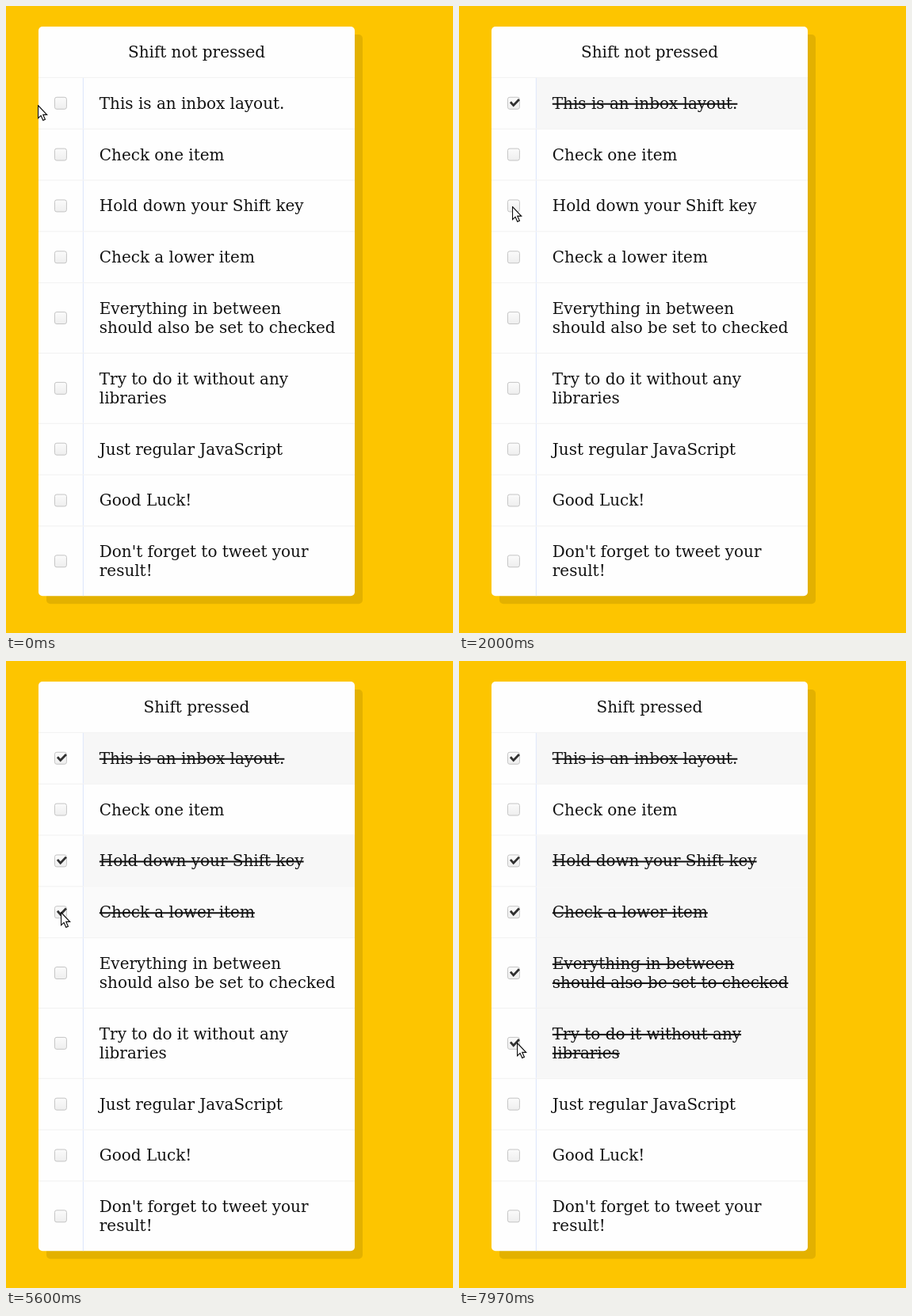
Write an HTML page that moves like this. It is 564 by 792 pixels and loops after 8 s.

```html
<!DOCTYPE html>
<html lang="en">
<head>
<meta charset="utf-8">
<title>Shift-select checklist</title>
<style>
  html, body { margin: 0; width: 100%; height: 100%; overflow: hidden; background: #fdc500; }
  .card {
    position: absolute; left: 41px; top: 26px; width: 400px;
    transform: scale(.9975); transform-origin: 0 0;
    font: 20px/24px "DejaVu Serif", serif; color: #111;
    background: #fefefe; border-radius: 5px; box-shadow: 10px 10px 0 rgba(0, 0, 0, .1);
  }
  .header { padding: 20px; text-align: center; }
  .header, .row { border-bottom: 1px solid #f1f1f1; }
  .row { position: relative; }
  .row:last-child { border: 0; }
  .label { position: relative; margin-left: 56px; padding: 20px; border-left: 1px solid #dbe5fb; }
  .shade { position: absolute; inset: 0; background: #f7f7f7; opacity: 0; }
  .text { position: relative; white-space: nowrap; }
  .done .text { text-decoration: line-through; }
  .check { position: absolute; left: 20px; top: calc(50% - 8px); overflow: visible; }
  .box { fill: url(#boxFill); stroke: #c4c4c4; }
  .hover .box { fill: #fdfdfd; stroke: #dcdcdc; }
  .tick { fill: none; stroke: #303030; stroke-width: 2.8; visibility: hidden; }
  .done .tick { visibility: visible; }
  .cursor { position: absolute; left: 0; top: 0; }
</style>
</head>
<body>
<div class="card">
  <div class="header"></div>
</div>
<svg class="cursor" width="14" height="22">
  <linearGradient id="boxFill" x2="0" y2="1">
    <stop stop-color="#fbfbfb"/><stop offset="1" stop-color="#eee"/>
  </linearGradient>
  <path d="M.5 .5V16.8L4.1 13.4 6.8 19.4 9.4 18.3 6.8 12.4H11.6Z"
        fill="#fff" stroke="#111" stroke-width="1.2"/>
</svg>
<script>
const LOOP = 8000, SHIFT_AT = 4100, FADE = 200;

// label, check time (if any)
const items = [
  ["This is an inbox layout.", 1480],
  ["Check one item"],
  ["Hold down your Shift key", 2770],
  ["Check a lower item", 5500],
  ["Everything in between<br>should also be set to checked", 6900],
  ["Try to do it without any<br>libraries", 6900],
  ["Just regular JavaScript"],
  ["Good Luck!"],
  ["Don't forget to tweet your<br>result!"],
];

// time, x, y of the pointer tip
const path = [
  [0, 40, 125], [400, 33, 126], [800, 42, 126], [1200, 75, 122], [1700, 75, 122],
  [2150, 64, 298], [2480, 68, 285], [2630, 73, 250], [3080, 73, 250], [3500, 66, 298],
  [4570, 67, 300], [5050, 69, 317], [5800, 69, 317], [6300, 66, 486], [6550, 67, 485],
  [6850, 73, 482], [8000, 73, 482],
];

const find = (selector, root = document) => root.querySelector(selector);
const card = find(".card"), header = find(".header"), cursor = find(".cursor");

const rows = items.map(([label, checkAt = Infinity]) => {
  const row = document.createElement("div");
  row.className = "row";
  row.innerHTML = `
    <svg class="check" width="16" height="16">
      <rect class="box" x=".5" y=".5" width="15" height="15" rx="2.5"/>
      <path class="tick" d="M4 6.5l3.8 4.3 7.2-7.6"/>
    </svg>
    <div class="label"><div class="shade"></div><span class="text">${label}</span></div>`;
  card.append(row);
  const bounds = row.getBoundingClientRect();
  return { row, checkAt, shade: find(".shade", row), middle: (bounds.top + bounds.bottom) / 2 };
});

function pointerAt(t) {
  const next = path.findIndex(p => p[0] > t);
  const [t0, x0, y0] = path[next - 1], [t1, x1, y1] = path[next];
  const u = (t - t0) / (t1 - t0), ease = u * u * (3 - 2 * u);
  return [x0 + (x1 - x0) * ease, y0 + (y1 - y0) * ease].map(Math.round);
}

function draw() {
  const t = performance.now() % LOOP;
  const [x, y] = pointerAt(t);
  cursor.style.transform = `translate(${x}px, ${y}px)`;
  header.textContent = t < SHIFT_AT ? "Shift not pressed" : "Shift pressed";
  for (const { row, shade, checkAt, middle } of rows) {
    row.classList.toggle("done", t >= checkAt);
    row.classList.toggle("hover", Math.hypot(x - 69, y - middle) < 20);
    shade.style.opacity = Math.max(0, Math.min(1, (t - checkAt) / FADE));
  }
  requestAnimationFrame(draw);
}
draw();
</script>
</body>
</html>
```
